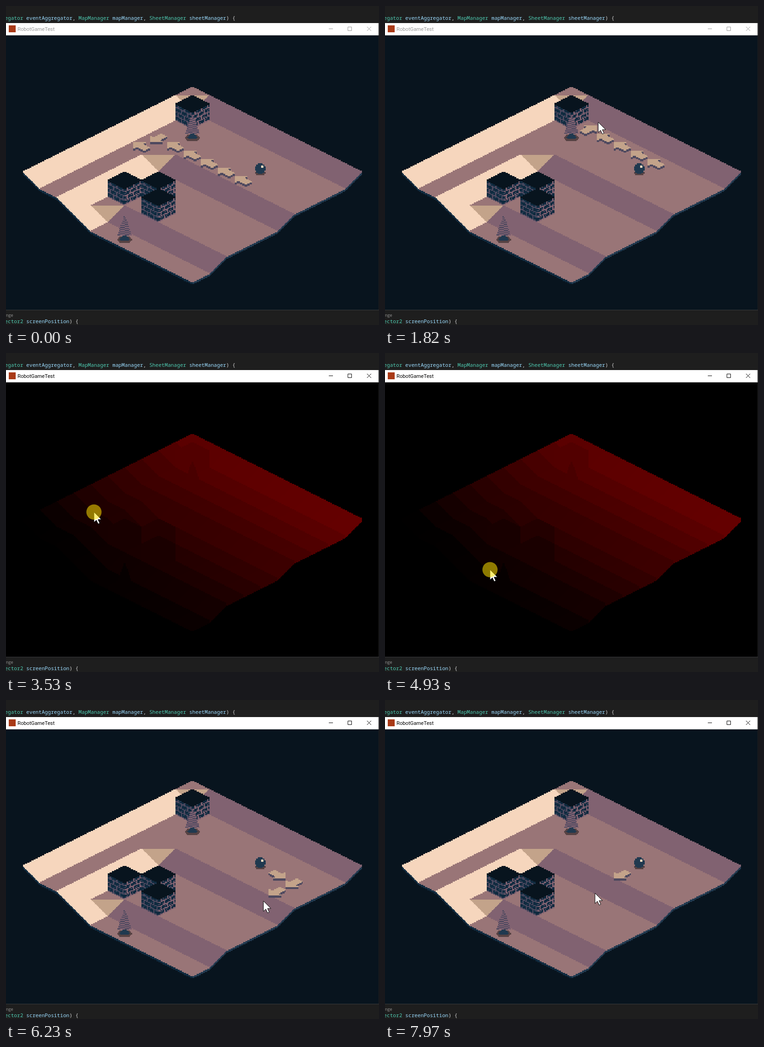
Animation of 810x692 px, one loop 7.99 s. Source, as an HTML page with a canvas:

```html
<!DOCTYPE html>
<html lang="en">
<head>
<meta charset="utf-8">
<title>RobotGameTest</title>
<style>
  html, body { margin: 0; width: 100%; height: 100%; overflow: hidden; background: #1e1e1e; }
  #view { position: absolute; left: 0; top: 64px; width: 809px; height: 595px; overflow: hidden; background: #08141e; }
  #view canvas { position: absolute; left: 0; top: -1px; width: 811.9px; height: 598px; image-rendering: pixelated; }
  svg { position: absolute; left: 0; top: 0; }
  .code { font: 11.13px "Noto Sans Mono", "DejaVu Sans Mono", monospace; fill: #d4d4d4; white-space: pre; }
  .type { fill: #4ec9b0; }
  .name { fill: #9cdcfe; }
  .title { font: 11.2px Roboto, "Open Sans", sans-serif; }
  .lens { font: 9px "Open Sans", "Noto Sans", sans-serif; fill: #999; }
</style>
</head>
<body>
<div id="view"><canvas id="game" width="353" height="260"></canvas></div>
<svg width="810" height="692" viewBox="0 0 810 692">
  <text class="code" x="-2.7" y="29.5"><tspan class="type">egator</tspan> <tspan class="name">eventAggregator</tspan>, <tspan class="type">MapManager</tspan> <tspan class="name">mapManager</tspan>, <tspan class="type">SheetManager</tspan> <tspan class="name">sheetManager</tspan>) {</text>
  <rect y="37" width="809" height="26.6" fill="#fff"/>
  <rect x="6" y="42" width="15" height="15" fill="#a93a17"/>
  <g id="chrome">
    <text class="title" x="25" y="54">RobotGameTest</text>
    <path d="M701 49.5h9M742.5 45.5h8v8h-8zM784 45l9 9M793 45l-9 9" fill="none" stroke="currentColor"/>
  </g>
  <rect y="659" width="810" height="1" fill="#3a3a3c"/>
  <text class="lens" x="0" y="674">nge</text>
  <text class="code" x="-2.7" y="688"><tspan class="type">ector2</tspan> <tspan class="name">screenPosition</tspan>) {</text>
  <g id="pointer">
    <path d="M0 0V22.5L5.2 17.6L9 25.8L12.6 24.2L8.9 16.2H16.2Z" fill="#fff" stroke="#000"/>
    <circle id="press" r="16.5" fill="#ffe100" fill-opacity=".54"/>
  </g>
</svg>
<script>
const LOOP = 7990, SCALE = 2.3, TOP = 63, SIZE = 10;
const START = [6, 2], FIRST_TARGET = [0, 4];
const HELD = [[3480, 4980], [6700, 7610]];
const INK = {
  night: '#08141e', navy: '#0f2a3f', steel: '#20394f', slate: '#4e495f',
  mauve: '#816271', brown: '#997577', tan: '#c3a38a', cream: '#f6d6bd', shade: '#564243'
};
// time, x, y
const TRACK = [
  [340, 664, 694], [1130, 593, 362], [1790, 463, 252], [1935, 463, 252],
  [2720, 265, 290], [2890, 247, 299], [3450, 191, 345], [4180, 191, 345],
  [4500, 188, 400], [4930, 228, 470], [4980, 229, 471], [5785, 447, 531],
  [6230, 559, 436], [6520, 589, 408], [7750, 589, 408], [7965, 456, 419]
];

const $ = id => document.getElementById(id);
const game = $('game').getContext('2d');

// ---- map geometry, in game pixels ----
const depth = (i, j) => (i >= 1 && j >= 1) + (i >= 3 && j >= 5) + (i >= 4 && j >= 9);

function point(i, j, u = 0, v = 0) {
  const sunk = (1 - v) * ((1 - u) * depth(i, j) + u * depth(i + 1, j)) +
    v * ((1 - u) * depth(i, j + 1) + u * depth(i + 1, j + 1));
  return [176 + 16 * (i + u - j - v), 49 + 8 * (i + u + j + v + sunk)];
}

const corners = (i, j) => [point(i, j), point(i + 1, j), point(i + 1, j + 1), point(i, j + 1)];

function eachTile(visit) {
  for (let i = 0; i < SIZE; i++) for (let j = 0; j < SIZE; j++) visit(i, j);
}

// ---- hard-edged drawing ----
function crossings(pts, row) {
  const xs = [];
  pts.forEach(([x1, y1], k) => {
    const [x2, y2] = pts[(k + 1) % pts.length];
    if ((y1 <= row) !== (y2 <= row)) xs.push(Math.round(x1 + (x2 - x1) * (row - y1) / (y2 - y1)));
  });
  return xs.sort((a, b) => a - b);
}

function eachRow(pts, visit) {
  const ys = pts.map(p => p[1]);
  for (let y = Math.floor(Math.min(...ys)); y < Math.max(...ys); y++) visit(y);
}

function poly(ctx, pts, color) {
  ctx.fillStyle = color;
  eachRow(pts, y => {
    const xs = crossings(pts, y + 0.5);
    for (let k = 0; k + 1 < xs.length; k += 2) ctx.fillRect(xs[k], y, xs[k + 1] - xs[k], 1);
  });
}

// Convex facet that also covers the pixels its sides only touch, as tile sprites do.
function facet(ctx, pts, color) {
  ctx.fillStyle = color;
  eachRow(pts, y => {
    const xs = [...crossings(pts, y + 0.02), ...crossings(pts, y + 0.98)];
    const left = Math.min(...xs);
    if (xs.length) ctx.fillRect(left, y, Math.max(...xs) - left, 1);
  });
}

function disc(ctx, cx, cy, rx, ry, color) {
  ctx.fillStyle = color;
  for (let y = Math.floor(cy - ry); y < cy + ry; y++) {
    const d = (y + 0.5 - cy) / ry;
    if (d * d >= 1) continue;
    const half = Math.round(rx * Math.sqrt(1 - d * d));
    ctx.fillRect(cx - half, y, 2 * half, 1);
  }
}

function dot(ctx, x, y, color) {
  ctx.fillStyle = color;
  ctx.fillRect(x, y, 1, 1);
}

const lower = (pts, dy) => pts.map(([x, y]) => [x, y + dy]);

// ---- scenery; tint(color, i, j) picks the paint ----
function drawGround(ctx, tint) {
  eachTile((i, j) => {
    const [a, b, d, c] = corners(i, j), h = depth(i, j);
    const fallsI = depth(i + 1, j) > h, fallsJ = depth(i, j + 1) > h;
    const edge = (p, q, color) => facet(ctx, [p, q, ...lower([q, p], 2)], tint(color, i, j));
    if (j === SIZE - 1) edge(c, d, INK.navy);
    if (i === SIZE - 1) edge(b, d, INK.steel);
    facet(ctx, [a, b, d, c], tint(fallsI ? INK.cream : fallsJ ? INK.mauve : INK.brown, i, j));
    if (!fallsI && !fallsJ && depth(i + 1, j + 1) > h) facet(ctx, [b, d, c], tint(INK.tan, i, j));
  });
}

function drawBlock(ctx, tint, i, j) {
  const [cx, base] = point(i, j), top = base - 16;
  const paint = color => tint(color, i, j);
  for (let k = 0; k < 16; k++) {
    for (let v = 0; v < 16; v++) {
      const mortar = v % 4 === 3 || (k + (v >> 2 & 1) * 3) % 6 === 2;
      const lit = (k + v) % 5 === 0;
      dot(ctx, cx - 16 + k, top + 8 + (k >> 1) + v, paint(mortar ? INK.slate : lit ? INK.steel : INK.navy));
      dot(ctx, cx + k, top + 15 - (k >> 1) + v, paint(mortar ? INK.mauve : lit ? INK.slate : INK.navy));
    }
  }
  facet(ctx, [[cx, top], [cx + 16, top + 8], [cx, top + 16], [cx - 16, top + 8]], paint(INK.night));
}

function drawTree(ctx, tint, i, j) {
  const [cx, cy] = point(i, j, 0.5, 0.5);
  const paint = color => tint(color, i, j);
  disc(ctx, cx, cy, 7, 3.5, paint(INK.shade));
  const pot = [[-2, -5], [2, -5], [2, -3], [5, -1], [4, 1], [-4, 1], [-5, -1], [-2, -3]];
  poly(ctx, pot.map(([x, y]) => [cx + x, cy + y]), paint(INK.steel));
  for (let r = 0; r < 18; r++) {
    const half = Math.round(0.7 + r * 0.36);
    for (let x = -half; x < half; x++) {
      dot(ctx, cx + x, cy - 22 + r, paint((r + (x + 16 >> 2)) & 1 ? INK.slate : INK.mauve));
    }
  }
}

function drawBall(ctx) {
  const [cx, cy] = point(...START, 0.5, 0.5);
  disc(ctx, cx, cy + 1, 5, 2.5, INK.shade);
  disc(ctx, cx, cy - 3, 5, 5, INK.steel);
  ctx.fillStyle = INK.cream;
  ctx.fillRect(cx + 1, cy - 6, 2, 2);
}

function drawSprites(ctx, tint, withBall) {
  drawBlock(ctx, tint, 1, 1);
  drawTree(ctx, tint, 2, 2);
  if (withBall) drawBall(ctx);
  [[3, 7], [4, 6], [5, 7]].forEach(([i, j]) => drawBlock(ctx, tint, i, j));
  drawTree(ctx, tint, 5, 9);
}

// ---- route from the ball to the tile under the pointer ----
function tileAt(x, y) {
  const gx = x / SCALE, gy = (y - TOP) / SCALE;
  let found = FIRST_TARGET;
  eachTile((i, j) => {
    const quad = corners(i, j);
    const inside = quad.every(([x1, y1], k) => {
      const [x2, y2] = quad[(k + 1) % 4];
      return (x2 - x1) * (gy - y1) - (y2 - y1) * (gx - x1) >= 0;
    });
    if (inside) found = [i, j];
  });
  return found;
}

function route([ti, tj]) {
  const tiles = [START];
  let [i, j] = START;
  const walk = (toI, toJ) => {
    while (i !== toI || j !== toJ) {
      i += Math.sign(toI - i);
      j += Math.sign(toJ - j);
      tiles.push([i, j]);
    }
  };
  if (ti > START[0]) {
    walk(ti, j);
  } else {
    const row = tj % 4 ? tj : Math.abs(tj - 1);   // rows 0, 4 and 8 are slopes
    walk(i, row);
    walk(Math.max(ti, 1), row);
  }
  walk(i, tj);
  walk(ti, tj);
  return tiles;
}

const ARROW = [[0.5, 0], [0.09, 0.41], [0.09, 0.2], [-0.35, 0.2], [-0.35, -0.2], [0.09, -0.2], [0.09, -0.41]];

function drawArrows(ctx, tiles) {
  for (let k = 1; k < tiles.length - 1; k++) {
    const [i, j] = tiles[k], di = tiles[k + 1][0] - i, dj = tiles[k + 1][1] - j;
    const shape = ARROW.map(([s, w]) => point(i, j, 0.5 + s * di - w * dj, 0.5 + s * dj + w * di));
    poly(ctx, lower(shape, 2), INK.slate);
    poly(ctx, lower(shape, 1), INK.slate);
    poly(ctx, shape, INK.tan);
  }
}

// ---- fixed layers ----
function layer(draw) {
  const c = document.createElement('canvas');
  c.width = 353;
  c.height = 260;
  draw(c.getContext('2d'));
  return c;
}
const plain = color => color;
const byTile = (color, i, j) => `rgb(${(9 - j) * 10 + i + 1},0,0)`;
const ground = layer(ctx => drawGround(ctx, plain));
const sprites = layer(ctx => drawSprites(ctx, plain, true));
const tileMap = layer(ctx => {
  drawGround(ctx, byTile);
  drawSprites(ctx, byTile, false);
});

// ---- animation ----
function pointerAt(t) {
  let k = 0;
  while (k < TRACK.length - 2 && TRACK[k + 1][0] <= t) k++;
  const [t1, x1, y1] = TRACK[k], [t2, x2, y2] = TRACK[k + 1];
  const p = Math.min(1, Math.max(0, (t - t1) / (t2 - t1)));
  return [x1 + (x2 - x1) * p, y1 + (y2 - y1) * p];
}

function render(t) {
  const [x, y] = pointerAt(t).map(Math.round);
  const held = HELD.some(([from, to]) => t >= from && t < to);
  game.fillStyle = held ? '#000' : INK.night;
  game.fillRect(0, 0, 353, 260);
  if (held) {
    game.drawImage(tileMap, 0, 0);
  } else {
    game.drawImage(ground, 0, 0);
    drawArrows(game, route(tileAt(x, y)));
    game.drawImage(sprites, 0, 0);
  }
  const tone = t >= HELD[0][0] ? '#000' : '#999';
  $('chrome').style.color = tone;
  $('chrome').style.fill = tone;
  $('pointer').setAttribute('transform', `translate(${x} ${y})`);
  $('pointer').style.display = t < TRACK[0][0] ? 'none' : '';
  $('press').style.display = held ? '' : 'none';
}

function tick() {
  render(performance.now() % LOOP);
  requestAnimationFrame(tick);
}
tick();
</script>
</body>
</html>
```
